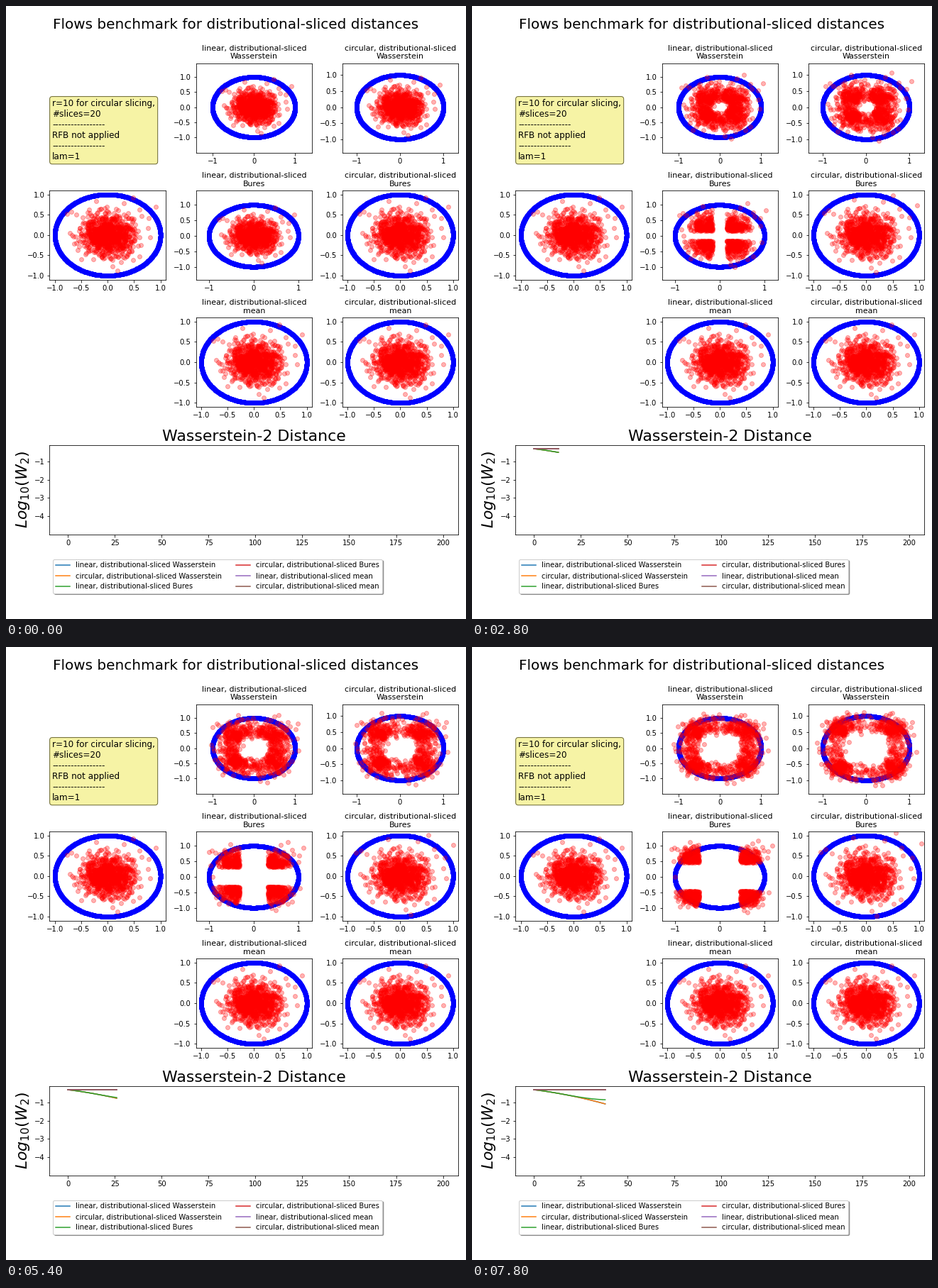
Recreate the animation shown at these times as a matplotlib script. Size 648 by 864 pixels, loop 8 s.

```python
import numpy as np
import matplotlib.pyplot as plt
from matplotlib.animation import FuncAnimation

W, H, DPI = 648, 864, 72
FRAMES, INTERVAL = 40, 200
STEP = 0.0121

plt.rcParams["font.family"] = "DejaVu Sans"
plt.rcParams["font.size"] = 10
fig = plt.figure(figsize=(W / DPI, H / DPI), dpi=DPI, facecolor="white")
rng = np.random.default_rng(4)


# ---- point cloud -------------------------------------------------------
def make_cloud():
    pts = rng.normal(0, 0.25, (1010, 2))
    pts = pts[np.hypot(*pts.T) < 0.68]
    far = [(-0.22, 0.84), (-0.02, 0.70), (0.31, 0.79), (0.48, 0.92),
           (-0.69, 0.58), (-0.77, 0.52), (-0.60, 0.51), (0.91, 0.69),
           (0.78, 0.41), (0.60, 0.62), (0.64, 0.46), (0.77, 0.17),
           (0.81, -0.05), (-0.67, 0.0), (-0.72, 0.05), (-0.50, -0.60),
           (0.48, -0.62), (0.60, -0.53), (0.18, -0.87), (0.09, -0.78),
           (0.25, -0.66), (-0.35, 0.62)]
    return np.vstack([pts, far])


cloud = make_cloud()
radius = np.hypot(*cloud.T)[:, None]
jitter = rng.normal(0, 0.08, cloud.shape)


def flow_radial(n, k):
    """Push outwards towards the ring, strongest along the diagonals."""
    s = STEP * n
    move = s * (np.tanh(k * cloud / radius) + jitter)
    d = np.hypot(*move.T)[:, None] + 1e-9
    room = np.maximum(1.15 - 0.9 * radius, 0.2)
    return cloud + move / (1 + (d / room) ** 4) ** 0.25


def flow_split(n):
    """Slide the four quadrants apart; outer points slow down."""
    cap = 0.3 / (cloud ** 2 + 0.005)
    return cloud + np.sign(cloud) * cap * (1 - np.exp(-STEP * n / cap))


def flow_spread(n):
    return cloud * (1 + 0.004 * n * np.minimum(radius, 1) ** 2)


def still(n):
    return cloud


# ---- layout ------------------------------------------------------------
def add_axes(x, y, w, h):
    return fig.add_axes([x / W, 1 - (y + h) / H, w / W, h / H])


LEFT, TOP, COL, ROW = 61.4, 80.5, 206.1, 179.3
WIDTH, HEIGHT = 163.6, 126
HALVES = [-1, -0.5, 0, 0.5, 1]
SQUARE = (-1.1, 1.1, -1.1, 1.1)
LIN, CIRC = "linear, distributional-sliced", "circular, distributional-sliced"

panels = [
    (1, 0, LIN + "\nWasserstein", (-1.40, 1.41, -1.506, 1.459),
     lambda n: flow_radial(n, 2.5)),
    (2, 0, CIRC + "\nWasserstein", (-1.33, 1.345, -1.413, 1.37),
     lambda n: flow_radial(n, 4)),
    (0, 1, "", SQUARE, still),
    (1, 1, LIN + "\nBures", (-1.29, 1.305, -1.417, 1.47), flow_split),
    (2, 1, CIRC + "\nBures", SQUARE, flow_spread),
    (1, 2, LIN + "\nmean", SQUARE, still),
    (2, 2, CIRC + "\nmean", SQUARE, still),
]

angle = np.linspace(0, 2 * np.pi, 500)
movers = []
for col, row, title, lim, flow in panels:
    ax = add_axes(LEFT + col * COL, TOP + row * ROW, WIDTH, HEIGHT)
    ax.scatter(np.cos(angle), np.sin(angle), s=36, color="blue")
    dots = ax.scatter(*cloud.T, s=36, color="red", alpha=0.3)
    ax.axis(lim)
    ax.set_xticks(HALVES if lim is SQUARE else [-1, 0, 1])
    ax.set_yticks(HALVES)
    ax.set_title(title, fontsize=11)
    movers.append((dots, flow))

fig.suptitle("Flows benchmark for distributional-sliced distances", fontsize=20)

rule = "-" * 17
note = "\n".join(["r=10 for circular slicing,", "#slices=20", rule,
                  "RFB not applied", rule, "lam=1"])
fig.text(65.2 / W, 1 - 131.2 / H, note, fontsize=12, va="top",
         bbox=dict(boxstyle="round", facecolor="#f6f3a5", edgecolor="#6b6830"))


# ---- distance chart ----------------------------------------------------
def log_radial(n):
    return -0.3 - 0.0127 * n - 0.000205 * n ** 2


def log_split(n):
    return -0.3 - 0.01069 * n - 0.000497 * n ** 2 + 1.047e-5 * n ** 3


def log_flat(n):
    return -0.3 + 0 * n


chart = add_axes(LEFT, TOP + 3 * ROW + 0.1, 2 * COL + WIDTH, HEIGHT)
chart.axis((-9.8, 208.2, -4.996, -0.084))
chart.set_xticks(range(0, 201, 25))
chart.set_yticks([-4, -3, -2, -1])
chart.set_title("Wasserstein-2 Distance", fontsize=22)
chart.set_ylabel("$Log_{10}(W_2)$", fontsize=22)

curves = [
    (LIN + " Wasserstein", log_radial),
    (CIRC + " Wasserstein", log_radial),
    (LIN + " Bures", log_split),
    (CIRC + " Bures", log_flat),
    (LIN + " mean", log_flat),
    (CIRC + " mean", log_flat),
]
lines = [(chart.plot([], [], label=name)[0], f) for name, f in curves]
chart.legend(loc="upper left", bbox_to_anchor=(66 / W, 1 - 779.5 / H),
             bbox_transform=fig.transFigure, borderaxespad=0, ncol=2,
             fontsize=10, fancybox=True, shadow=True)


def draw(i):
    n = max(i - 1, 0)
    for dots, flow in movers:
        dots.set_offsets(flow(n))
    steps = np.arange(i)
    for line, f in lines:
        line.set_data(steps, f(steps))
    return []


anim = FuncAnimation(fig, draw, frames=FRAMES, interval=INTERVAL,
                     repeat=True, repeat_delay=0)
plt.show()
```
